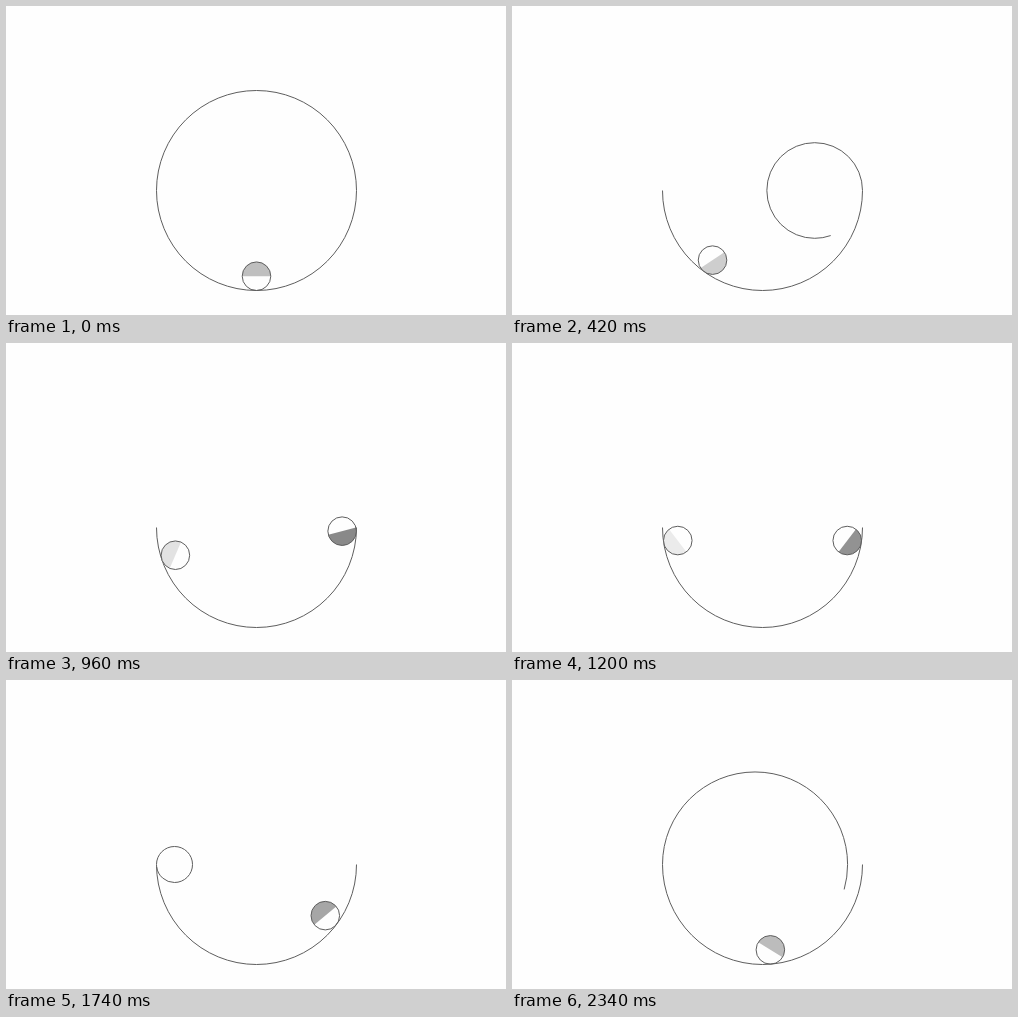
Animation of 500x309 px, one loop 2.4 s. Source, as an HTML page with a canvas:

```html
<!DOCTYPE html>
<html lang="en">
<head>
<meta charset="utf-8">
<title>Rolling curl</title>
<style>
html, body { margin: 0; height: 100%; overflow: hidden; background: #fefefe; }
canvas { display: block; }
</style>
</head>
<body>
<canvas id="stage" width="500" height="309"></canvas>
<script>
const ctx = document.getElementById('stage').getContext('2d');
const LOOP = 2400, STEP = 60, CURL = 690, FALL = LOOP - CURL;
const CX = 250.5, CY = 184.5, R = 100, BALL = R / 7;
const OMEGA = 1.854075 / FALL; // pendulum released from horizontal reaches the bottom after FALL

// Angle from the bottom, a given time after release
function swing(time) {
  const n = 200, dt = time * OMEGA / n;
  let angle = Math.PI / 2, speed = 0;
  for (let i = 0; i < n; i++) {
    speed -= Math.sin(angle) * dt / 2;
    angle += speed * dt;
    speed -= Math.sin(angle) * dt / 2;
  }
  return angle;
}

function arc(x, y, r, from, to, reverse) {
  ctx.beginPath();
  ctx.arc(x, y, r, from, to, reverse);
}

// The upper half winds up into a small circle at one end of the bowl
function drawCurl(progress, side) {
  const r = R + (BALL - R) * progress;
  const sweep = Math.PI * (1 + progress);
  const start = side > 0 ? 0 : Math.PI;
  arc(CX + side * (R - r), CY, r, start, start - side * sweep, side > 0);
  ctx.stroke();
}

// Rolls without slipping, so it turns six times as fast as it travels
function drawBall(angle, grey) {
  const x = CX + (R - BALL) * Math.sin(angle);
  const y = CY + (R - BALL) * Math.cos(angle);
  const turn = 6 * angle;
  arc(x, y, BALL, turn - Math.PI, turn);
  ctx.fillStyle = `rgb(${grey},${grey},${grey})`;
  ctx.fill();
  arc(x, y, BALL, 0, 2 * Math.PI);
  ctx.stroke();
}

function draw(t) {
  ctx.fillStyle = '#fefefe';
  ctx.fillRect(0, 0, 500, 309);
  ctx.strokeStyle = '#5e5e5e';
  ctx.lineWidth = 1;
  arc(CX, CY, R, 0, Math.PI);
  ctx.stroke();

  if (t < CURL) drawCurl(t / CURL, 1);
  else drawBall(swing(t - CURL), Math.round(127 + 63.5 * (t - CURL) / FALL));

  if (t > FALL) drawCurl((LOOP - t) / CURL, -1);
  else drawBall(-swing(FALL - t), Math.round(190.5 + 63.5 * t / FALL));
}

const began = performance.now();
function tick() {
  const t = (performance.now() - began) % LOOP;
  draw(Math.floor(t / STEP) * STEP);
  requestAnimationFrame(tick);
}
tick();
</script>
</body>
</html>
```
